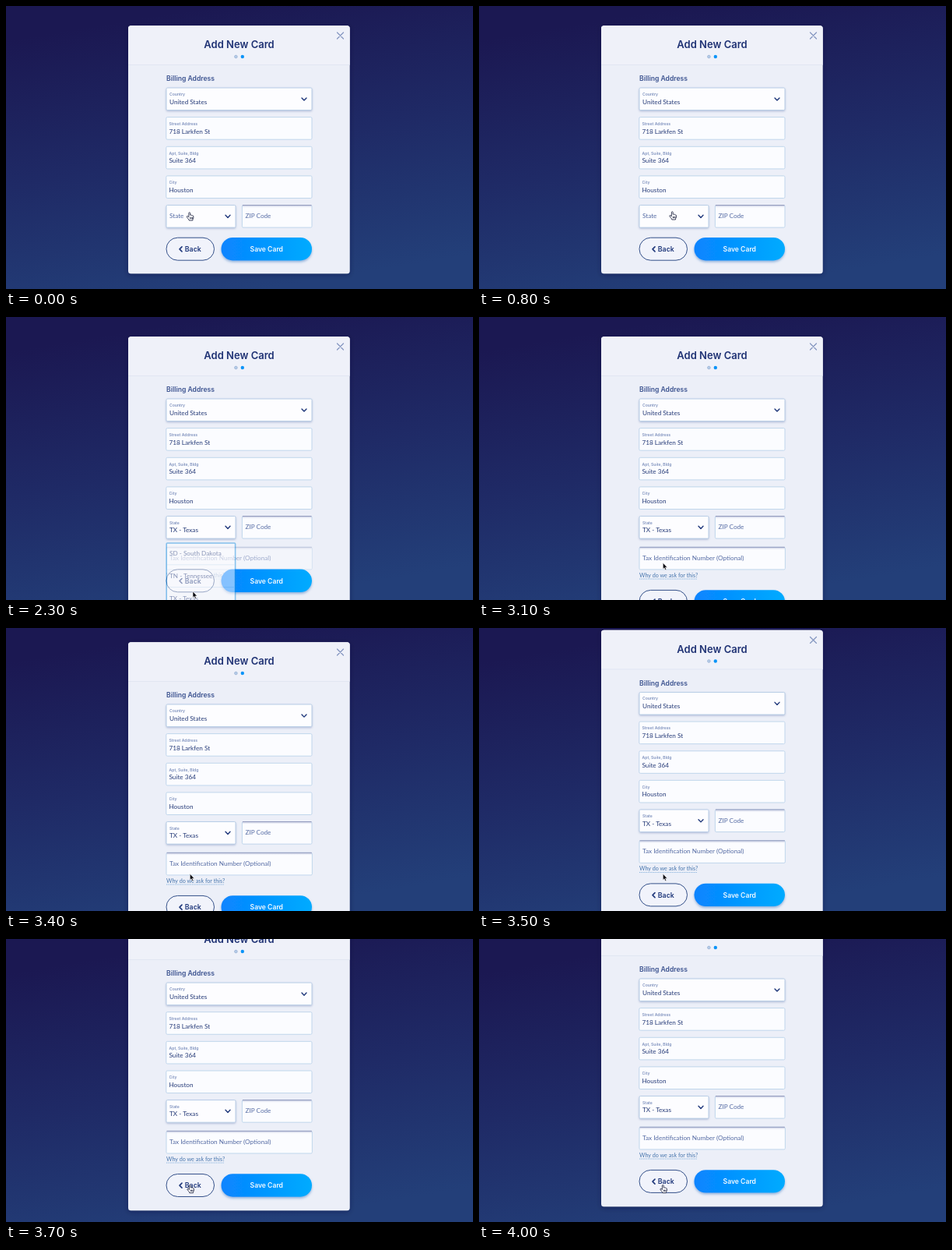
Write an HTML page that moves like this. It is 600 px wide and 363 px high and loops after 4600 ms.

```html
<!DOCTYPE html>
<html lang="en">
<head>
<meta charset="utf-8">
<title>Add New Card</title>
<style>
html, body { margin: 0; width: 100%; height: 100%; overflow: hidden; background: #1f2a66; }
svg { display: block; width: 100vw; height: 100vh; }
text { white-space: pre; }
.b { font-family: Inter, sans-serif; font-weight: 600; }
.r { font-family: Lato, sans-serif; font-size: 8.2px; }
.title { font-size: 13px; fill: #1f3274; text-anchor: middle; }
.head { font-size: 8.6px; fill: #3c5390; }
.label { font-size: 5.1px; fill: #7e91bd; }
.value { fill: #263b78; }
.hint { fill: #546aa3; }
.pale { fill: #8d9cc2; }
.link { font-size: 7.2px; fill: #4675ad; }
</style>
</head>
<body>
<svg id="stage" viewBox="0 0 600 363" xmlns="http://www.w3.org/2000/svg"></svg>
<script>
const LOOP = 4600, STEP = 100;
const stage = document.getElementById('stage');

const text = (x, y, cls, s, more = '') => `<text x="${x}" y="${y}" class="${cls}" ${more}>${s}</text>`;
const rect = (x, y, w, h, r, more) => `<rect x="${x}" y="${y}" width="${w}" height="${h}" rx="${r}" ${more}/>`;
const line = (d, color, w, more = '') => `<path d="${d}" fill="none" stroke="${color}" stroke-width="${w}" ${more}/>`;
const chevron = (x, y, dir = 1) =>
  line(`M${x - 3} ${y - 1.6 * dir}l3 ${3.2 * dir}l3 ${-3.2 * dir}`, '#21397c', 1.4, 'stroke-linecap="round" stroke-linejoin="round"');

// Field boxes: raised for selects, plain for filled inputs, sunken for empty inputs
const raised = (x, y, w) => rect(x, y, w, 28.6, 1.5, 'fill="#fdfdff" stroke="#b3cae5" stroke-width=".9" filter="url(#lift)"');
const plain = (x, y, w) => rect(x, y, w, 28.6, 1.5, 'fill="#fbfcff" stroke="#bad3ea" stroke-width=".9"');
const sunken = (x, y, w) => plain(x, y, w) +
  rect(x + .4, y + .5, w - .8, 2.6, 1, 'fill="url(#inset)"') +
  line(`M${x + .5} ${y}h${w - 1}`, '#9199bd', 1);
const filled = (y, label, value) => plain(205.8, y, 187.2) +
  text(209.5, y + 10.3, 'b label', label) + text(209.5, y + 20.9, 'r value', value);

const defs = `<defs>
  <linearGradient id="bg" gradientUnits="userSpaceOnUse" x1="270" y1="0" x2="330" y2="363">
    <stop offset="0" stop-color="#1b1852"/><stop offset=".5" stop-color="#1f2a66"/><stop offset="1" stop-color="#233f79"/>
  </linearGradient>
  <linearGradient id="save"><stop offset="0" stop-color="#0884ff"/><stop offset="1" stop-color="#00abff"/></linearGradient>
  <linearGradient id="inset" x2="0" y2="1">
    <stop offset="0" stop-color="#9aa3c8" stop-opacity=".45"/><stop offset="1" stop-color="#9aa3c8" stop-opacity="0"/>
  </linearGradient>
  <filter id="lift" x="-10%" y="-20%" width="120%" height="160%">
    <feDropShadow dx="0" dy="1.2" stdDeviation="1.1" flood-color="#5a6fa8" flood-opacity=".4"/>
  </filter>
  <filter id="glow" x="-10%" y="-20%" width="120%" height="170%">
    <feDropShadow dx="0" dy="2" stdDeviation="1.8" flood-color="#3b78c0" flood-opacity=".5"/>
  </filter>
  <filter id="shade" x="-10%" y="-10%" width="120%" height="120%">
    <feDropShadow dx="0" dy="1.5" stdDeviation="3" flood-color="#0b0d3a" flood-opacity=".4"/>
  </filter>
  <clipPath id="drop"><rect id="dropClip" x="200" y="288" width="100" height="0"/></clipPath>
</defs>`;

const header =
  text(299.5, 54.4, 'b title', 'Add New Card') +
  '<circle cx="295.4" cy="65" r="1.8" fill="#b9cfe9" stroke="#8aa5cf" stroke-width=".7"/>' +
  '<circle cx="303.8" cy="65" r="2.2" fill="#0a94f8"/>' +
  line('M157 75.5h284.5', '#dfe4f1', .8) +
  line('M425.5 34l8 8m0 -8l-8 8', '#8496c0', 1.2, 'stroke-linecap="round"');

const fields =
  text(206, 96.4, 'b head', 'Billing Address') +
  raised(206, 105, 187) + text(210, 115, 'b label', 'Country') +
  text(210, 125.7, 'r value', 'United States') + chevron(383, 119.5) +
  filled(142.6, 'Street Address', '718 Larkfen St') +
  filled(180.3, 'Apt, Suite, Bldg', 'Suite 364') +
  filled(217.9, 'City', 'Houston') +
  sunken(303.4, 255.5, 89.6) + text(307.5, 272.2, 'r hint', 'ZIP Code');

const stateLabel = more => text(210, 265.8, 'b label', 'State', more);
const stateField =
  `<g id="empty">${raised(206, 255.5, 89) + text(210, 272.2, 'r hint', 'State') + chevron(285, 269.8)}</g>` +
  `<g id="focus">${rect(206.2, 255.7, 88.6, 28.4, 1.5, 'fill="#fdfdff" stroke="#1c90e0" stroke-width="1.6"') +
    stateLabel('style="fill:#2c5796"') + text(210, 276.4, 'r pale', 'Select one') + chevron(285, 269.8, -1)}</g>` +
  `<g id="chosen">${raised(206, 255.5, 89) + stateLabel() + text(210, 276.4, 'r value', 'TX - Texas') + chevron(285, 269.8)}</g>`;

const tax = `<g id="tax">${sunken(206, 295.3, 187.4) +
  text(210, 311.9, 'r hint', 'Tax Identification Number (Optional)') +
  text(206, 334, 'r link', 'Why do we ask for this?', 'style="font-size:7.2px"') +
  line('M206 336h74', '#6ea3d6', .8, 'stroke-dasharray="1.2 1"')}</g>`;

const buttons = `<g id="buttons">${
  rect(206, 297.2, 61.5, 29, 14.5, 'fill="#f1f3fb" stroke="#345089" stroke-width="1"') +
  line('M226 308.9l-3 3l3 3', '#21397c', 1.6, 'stroke-linecap="round" stroke-linejoin="round"') +
  text(229.8, 315, 'b', 'Back', 'font-size="8.8" fill="#21397c"') +
  rect(276.5, 297, 116.5, 29.4, 14.7, 'fill="url(#save)" filter="url(#glow)"') +
  text(334.8, 315, 'b', 'Save Card', 'font-size="8.6" fill="#f4faff" text-anchor="middle"')}</g>`;

const rows = ['SD - South Dakota', 'TN - Tennessee', 'TX - Texas'];
const list = `<g id="list" clip-path="url(#drop)">${
  rect(206.2, 290, 88.4, 90, 1, 'fill="#fdfdff" stroke="#1c90e0" stroke-width="1.6"') +
  rows.map((s, i) => text(210, 305.6 + 29 * i, 'r value', s) +
    (i ? line(`M207 ${289 + 28.8 * i}h86.8`, '#c7dff0', .8) : '')).join('')}</g>`;

const hand = `<path id="hand" fill="#fff" stroke="#1d2340" stroke-width=".85" stroke-linejoin="round"
  d="M-.9 .7Q0 -.6 .9 .7V3.6Q1.9 2.9 2.5 3.9Q3.5 3.3 4 4.3Q5.1 4.1 5.1 5.3V7.4Q4.8 8.6 4.2 9.2V10.4H-.6V9.5Q-2 8.2 -3.4 5.9Q-3.5 4.7 -2.3 5L-.9 6.2Z
  M1 6.4V8.6M2.4 6.4V8.6M3.7 6.4V8.6"/>`;
const arrow = `<path id="arrow" fill="#0a0a12" stroke="#fff" stroke-width=".6" stroke-linejoin="round"
  d="M0 0V8L1.8 6.4L3.1 9.3L4.5 8.7L3.2 5.9H5.6Z"/>`;

stage.innerHTML = defs + rect(0, 0, 600, 363, 0, 'fill="url(#bg)"') +
  `<g id="page"><g filter="url(#shade)">${rect(157, 25.3, 284.7, 318, 3.5, 'id="card" fill="#eceff8"')}</g>
  <path d="M157 75.5V29q0 -3.7 3.7 -3.7h277.3q3.7 0 3.7 3.7V75.5z" fill="#eff1f9"/>
  ${header + fields + tax + buttons + stateField + list}</g>
  <g id="cursor">${hand + arrow}</g>`;

const el = id => document.getElementById(id);
const set = (id, name, v) => el(id).setAttribute(name, v);
const show = (id, on) => set(id, 'visibility', on ? 'visible' : 'hidden');
const part = (t, a, b) => Math.min(1, Math.max(0, (t - a) / (b - a)));
const smooth = u => u * u * (3 - 2 * u);
const glide = u => 1 - (1 - u) ** 3 * (1 + 2.9 * u);
const out = u => 1 - (1 - u) ** 2;

// Pointer moves: start, end, x, y, easing
const moves = [
  [0, 600, 248.3, 263.6, smooth],
  [1300, 1600, 238.6, 333.8, smooth],
  [1600, 1900, 240, 352, out],
  [2800, 3100, 236.3, 315.3, smooth]
];
function pointer(t) {
  let x = 235.7, y = 264.6;
  for (const [a, b, tx, ty, ease] of moves) {
    const p = ease(part(t, a, b));
    x += (tx - x) * p;
    y += (ty - y) * p;
  }
  return [x, y];
}

function draw(t) {
  const open = smooth(part(t, 800, 1000));
  const grow = smooth(part(t, 2200, 2400));
  const scroll = 54 * glide(part(t, 3310, 3880));
  const [x, y] = pointer(t);

  show('empty', open === 0);
  show('focus', open > 0 && grow === 0);
  show('chosen', grow > 0);
  set('dropClip', 'height', 80 * open);
  set('list', 'opacity', 1 - grow);
  set('tax', 'opacity', grow);
  set('card', 'height', 318 + 54 * grow);
  set('buttons', 'transform', `translate(0 ${53.2 * grow})`);
  set('page', 'transform', `translate(0 ${-scroll})`);

  const onBack = scroll > 35.5;
  show('hand', y < 286 || onBack);
  show('arrow', y >= 286 && !onBack);
  set('cursor', 'transform', `translate(${x} ${y})`);
}

const start = performance.now();
function tick(now) {
  const t = Math.max(0, now - start) % LOOP;
  draw(Math.floor(t / STEP) * STEP);
  requestAnimationFrame(tick);
}
draw(0);
requestAnimationFrame(tick);
</script>
</body>
</html>
```
